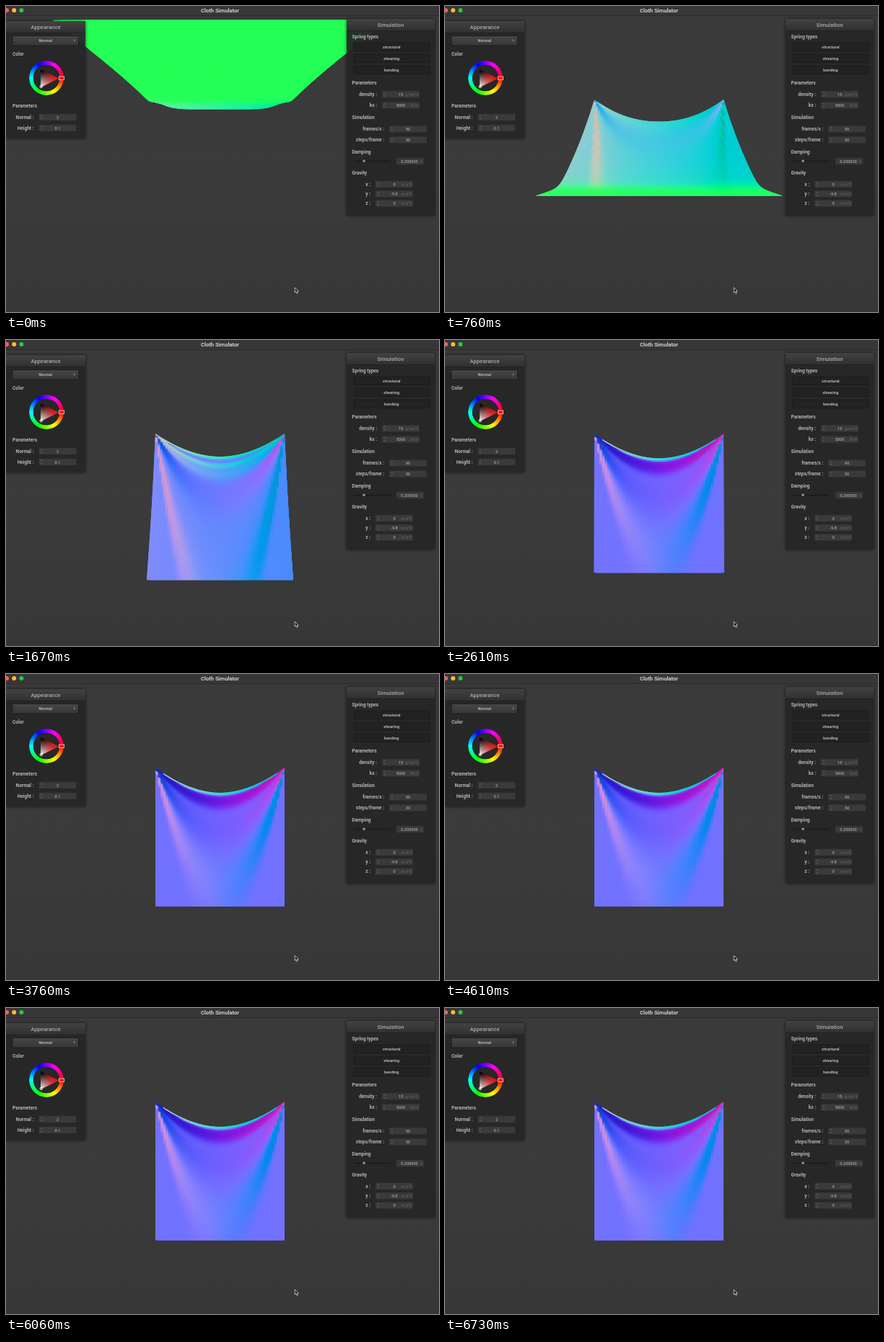
Recreate the animation shown at these times as an HTML page with a canvas. Size 600x425 px, loop 6.76 s.

```html
<!DOCTYPE html>
<html lang="en">
<head>
<meta charset="utf-8">
<title>Cloth Simulator</title>
<style>
  html, body { margin: 0; width: 100%; height: 100%; overflow: hidden; background: #393939; }
  #stage { position: relative; width: 600px; height: 425px; overflow: hidden;
    background: linear-gradient(#3a3a3a 14px, #3b3b3b 50%, #373737); }
  #stage > * { position: absolute; left: 0; top: 0; }
  text { font-family: Roboto, sans-serif; dominant-baseline: central; }
  #wheel { left: 32px; top: 76px; width: 48px; height: 48px; border-radius: 50%;
    background: conic-gradient(from 90deg, red, yellow, lime, cyan, blue, magenta, red);
    -webkit-mask: radial-gradient(circle, transparent 18px, #000 18.7px);
    mask: radial-gradient(circle, transparent 18px, #000 18.7px); }
  #shade { left: 48px; top: 88px; width: 25px; height: 25px;
    clip-path: polygon(0 0, 100% 50%, 0 100%);
    background: linear-gradient(90deg, transparent, red), linear-gradient(#000 10%, #fff); }
</style>
</head>
<body>
<div id="stage">
  <canvas id="cloth" width="600" height="425"></canvas>
  <svg id="ui" width="600" height="425"></svg>
  <div id="wheel"></div>
  <div id="shade"></div>
  <svg width="600" height="425" fill="none">
    <rect x="73.5" y="98" width="7" height="4.5" fill="#f00" stroke="#f4c8c8" stroke-width=".9"/>
    <circle cx="48.7" cy="112" r="1.8" stroke="#eee" stroke-width=".9"/>
    <path d="M400.3 391v7l1.6-1.4 1.2 2.7 1.2-.6-1.2-2.5h2.2z" fill="#111" stroke="#ddd" stroke-width=".8"/>
  </svg>
</div>
<script>
// ---------- interface ----------
const parts = [];
const add = s => parts.push(s);
const rect = (x, y, w, h, fill, extra = '') =>
  add(`<rect x="${x}" y="${y}" width="${w}" height="${h}" fill="${fill}" ${extra}/>`);
const label = (s, x, y, anchor = 'start', size = 6.5, fill = '#b4b4b4', weight = 700) =>
  add(`<text x="${x}" y="${y}" text-anchor="${anchor}" font-size="${size}" fill="${fill}" font-weight="${weight}">${s}</text>`);

function panel(x, y, w, h, title) {
  rect(x, y, w, h, '#262626', 'rx="1" opacity=".94" filter="url(#shadow)"');
  rect(x, y, w, 16, 'url(#head)', 'rx="1"');
  rect(x, y + 16, w, .7, '#1d1d1d');
  label(title, x + w / 2, y + 8.6, 'middle', 7.7, '#a9a9a9', 500);
}
function button(s, x, y, w, h, fill) {
  rect(x, y, w, h, fill, 'rx="1" stroke="#1a1a1a" stroke-width=".8"');
  label(s, x + w / 2, y + h / 2 + .2, 'middle', 5.6);
}
function field(x, y, w, value, unit = '') {
  rect(x, y - 4.6, w, 9.2, '#3a3a3a', 'rx="1" stroke="#303030" stroke-width=".6"');
  label(value, x + (w > 50 ? 26 : 18), y + .2, 'middle', 5.6, '#c0c0c0', 400);
  label(unit, x + w - 1.5, y + .2, 'end', 5.4, '#666', 400);
}
function numberRow(x, y, name, value, unit) {
  field(x, y, 52, value, unit);
  add(`<path d="M${x + 2.6} ${y - 1.2}l1.2-1.4 1.2 1.4m-2.4 2.4l1.2 1.4 1.2-1.4" fill="none" stroke="#777" stroke-width=".6"/>`);
  label(name, x - 7, y, 'end');
}
function group(title, titleX, titleY, x, y, step, rows) {
  label(title, titleX, titleY);
  rows.forEach((row, i) => numberRow(x, y + i * step, ...row));
}

add(`<defs>
  <linearGradient id="head" x2="0" y2="1"><stop stop-color="#424242"/><stop offset="1" stop-color="#303030"/></linearGradient>
  <linearGradient id="btn" x2="0" y2="1"><stop stop-color="#464646"/><stop offset="1" stop-color="#363636"/></linearGradient>
  <filter id="shadow"><feDropShadow dx="0" dy="0" stdDeviation="2" flood-color="#000" flood-opacity=".7"/></filter>
</defs>`);

rect(0, 0, 600, 13, '#383638');
rect(0, 13, 600, 1, '#2c2c2c');
['#ff5f57', '#febc2e', '#28c840'].forEach((c, i) =>
  add(`<circle cx="${1 + 10.2 * i}" cy="6" r="3" fill="${c}"/>`));
label('Cloth Simulator', 296.5, 6.3, 'middle', 7.6, '#cfcfcf');

panel(0, 21, 110, 163, 'Appearance');
button('Normal', 9, 41.5, 91.5, 13.5, 'url(#btn)');
add('<path d="M94 46.3l1.5 1.5-1.5 1.5" fill="none" stroke="#bbb" stroke-width=".8"/>');
label('Color', 9, 66.8);
group('Parameters', 9, 138.8, 45.5, 154.5, 15, [['Normal :', '2'], ['Height :', '0.1']]);

panel(472, 18, 122, 273, 'Simulation');
label('Spring types', 479.5, 43.3);
['structural', 'shearing', 'bending'].forEach((s, i) =>
  button(s, 481.5, 51 + 16 * i, 105.5, 11.5, '#222'));
group('Parameters', 479.5, 107, 521, 122.7, 15.2, [['density :', '15', 'g/cm^2'], ['ks :', '5000', 'N/m']]);
group('Simulation', 479.5, 155, 531, 170.8, 15.2, [['frames/s :', '90'], ['steps/frame :', '30']]);
group('Gravity', 479.5, 232.3, 512, 247.6, 13.3,
  [['x :', '0', 'm/s^2'], ['y :', '-9.8', 'm/s^2'], ['z :', '0', 'm/s^2']]);
label('Damping', 479.5, 203);
rect(482, 214.7, 51, 1.8, '#1c1c1c', 'rx=".9"');
add('<circle cx="496" cy="215.3" r="2.3" fill="#777" stroke="#222" stroke-width=".7"/><circle cx="496" cy="215.3" r="1" fill="#aaa"/>');
field(541, 215.7, 38, '0.200000', '%');
document.getElementById('ui').innerHTML = parts.join('');

// ---------- cloth ----------
const LOOP = 6760, COLS = 50, ROWS = 90;
const WIDTH = 179, LENGTH = 192.6;
const CX = 296.5, CY = 222, TOP = -92, DEPTH = 291.5;
const SOFT = .06; // rounding of the fold between hanging and flat cloth

const fade = (t, span, power) => Math.exp(-((t / span) ** power));
const bump = (x, centre, width) => Math.exp(-(((x - centre) / width) ** 2));

// The sheet falls flat, hinged at two corners, then settles upright. t in seconds.
function poseAt(t) {
  const fresh = fade(t, .45, 2);
  const endZ = WIDTH * fade(t, 1.354, 2.38);
  const endD = LENGTH - WIDTH * fade(t, .834, 2.08);
  const kneeZ = endZ * (.8 - .64 * fresh);
  const kneeD = endD * (.8 + .2 * fade(t, 1.25, 6));
  const upper = Math.hypot(kneeZ, kneeD);
  return {
    endZ, endD, kneeZ, kneeD,
    knee: upper / (upper + Math.hypot(endZ - kneeZ, endD - kneeD)),
    open: endZ / WIDTH,
    sag: 35 - 4 * fade(t, 2.2, 4) - 17.4 * fade(t, .4, 2),
    power: 1.9 + 4 * fresh,
    folds: 1 - fresh,
    rim: 2.2 * (1 - fade(t, 1.5, 4)),
    settled: 1 - fade(t, 2.1, 6),
    ripple: bump(t, 1.5, .5)
  };
}

const swag = (u, p) => 1 - Math.abs(2 * u - 1) ** p.power;
const upperPart = (v, k) => (v - Math.hypot(v - k, SOFT) + Math.hypot(k, SOFT)) / 2;

function project(u, v, p) {
  const sag = p.sag * swag(u, p);
  const upper = upperPart(v, p.knee);
  const a = upper / p.knee, b = (v - upper) / (1 - p.knee);
  const z = p.kneeZ * a + (p.endZ - p.kneeZ) * b;
  const drop = sag + (p.kneeD - sag) * a + (p.endD - p.kneeD) * b;
  const half = WIDTH / 2 - 4 * p.open * Math.sin(Math.PI * v);
  const s = DEPTH / (DEPTH - z);
  return [CX + (2 * u - 1) * half * s, CY + (TOP + drop) * s];
}

// Folds run along a family of swags through both corners; q is the swag's depth
function foldTilt(u, v, p) {
  const side = 2 * u - 1, w = Math.max(.04, swag(u, p));
  const top = p.sag * w / WIDTH;
  const y = top + v * (LENGTH / WIDTH - top);
  const slope = -2 * p.power * Math.sign(side) * Math.abs(side) ** (p.power - 1);
  const x = y / w - p.sag / WIDTH;
  const m = p.folds * (p.rim * bump(x, 0, .022)
    - p.settled * bump(x, .07, .06)
    - .14 * bump(x, .3, .2)
    + .1 * bump(x, 1.25 - .5 * p.settled, .25)
    + p.ripple * (.8 * bump(x, .08, .025) + .35 * bump(x, .14, .07)));
  const tx = m * y * slope / (w * w), ty = m / w;
  const limit = Math.sqrt(1 + .5 * (tx * tx + ty * ty));
  return [tx / limit, ty / limit];
}

// Colour is the surface normal, shown on a wide-gamut screen
function colour(u, v, p) {
  const k = p.knee, up = (1 - (v - k) / Math.hypot(v - k, SOFT)) / 2;
  const dz = p.kneeZ * up / k + (p.endZ - p.kneeZ) * (1 - up) / (1 - k);
  const dd = p.kneeD * up / k + (p.endD - p.kneeD) * (1 - up) / (1 - k);
  const len = Math.hypot(dz, dd), ny = dz / len, nz = dd / len;
  const [foldX, foldY] = foldTilt(u, v, p);
  const tx = nz * (foldX + .66 * p.open * (1 - 2 * u)), ty = nz * foldY;
  const n = [tx, ny + ty * nz, nz - ty * ny];
  const size = Math.hypot(...n);
  const [r, g, b] = n.map(c => 114 + 141 * c / size);
  const red = r - .55 * Math.max(0, g - r), blue = b - .2 * Math.max(0, g - b);
  return `rgb(${Math.round(red)},${Math.round(g)},${Math.round(blue)})`;
}

const ctx = document.getElementById('cloth').getContext('2d');

function draw(t) {
  const p = poseAt(t), w = COLS + 1, pts = [];
  for (let j = 0; j <= ROWS; j++)
    for (let i = 0; i <= COLS; i++) pts.push(project(i / COLS, j / ROWS, p));

  ctx.clearRect(0, 0, 600, 425);
  // Cells reach under their neighbours so no seams show
  for (let j = 0; j < ROWS; j++) {
    const j2 = Math.min(ROWS, j + 2);
    for (let i = 0; i < COLS; i++) {
      const i2 = Math.min(COLS, i + 2);
      ctx.fillStyle = colour((i + .5) / COLS, (j + .5) / ROWS, p);
      ctx.beginPath();
      ctx.moveTo(...pts[j * w + i]);
      ctx.lineTo(...pts[j * w + i2]);
      ctx.lineTo(...pts[j2 * w + i2]);
      ctx.lineTo(...pts[j2 * w + i]);
      ctx.fill();
    }
  }
}

const start = performance.now();
function tick() {
  draw((performance.now() - start) % LOOP / 1000);
  requestAnimationFrame(tick);
}
tick();
</script>
</body>
</html>
```
